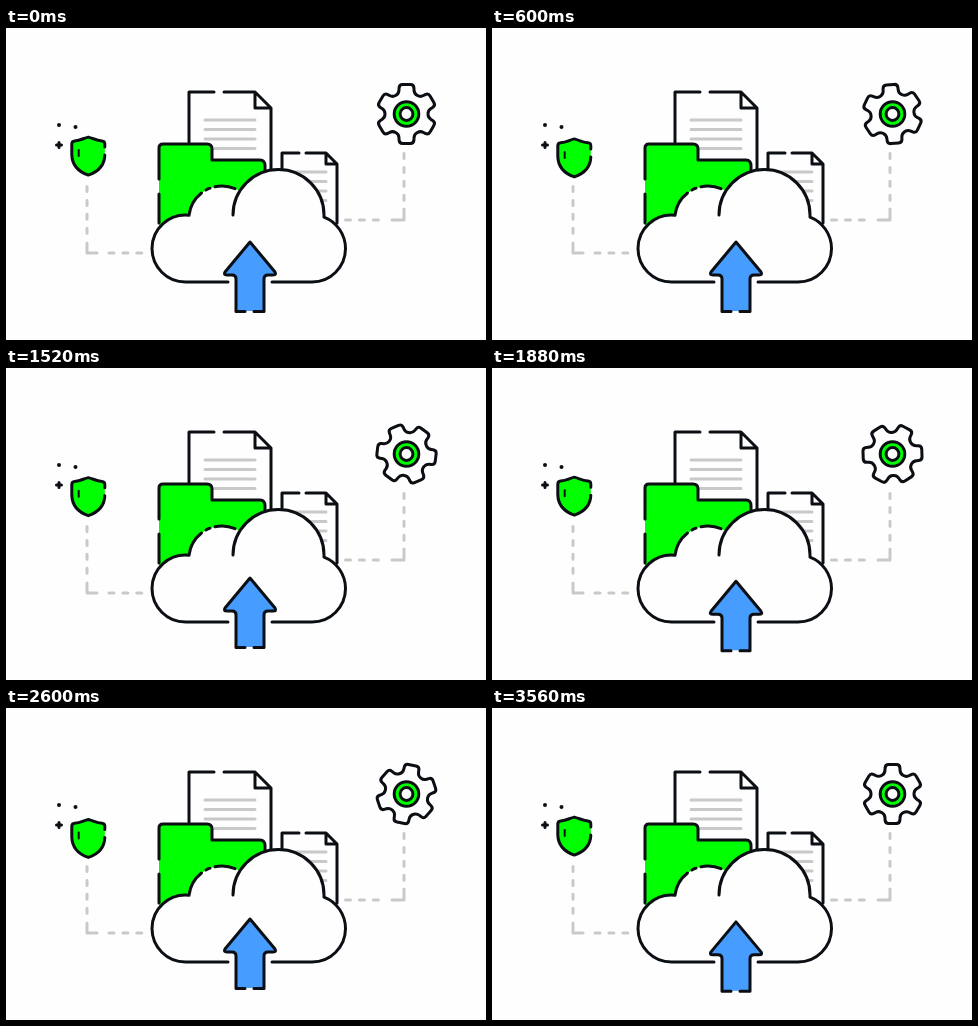
An HTML page that plays this animation: 480x312 px, repeating every 3.6 s.

```html
<!DOCTYPE html>
<html lang="en">
<head>
<meta charset="utf-8">
<title>Cloud upload</title>
<style>
  html, body { margin: 0; width: 100%; height: 100%; overflow: hidden; background: #fefefe; }
  svg { display: block; width: 480px; height: 312px; }
  .ink { fill: none; stroke: #0b0f14; stroke-width: 3; stroke-linecap: round; stroke-linejoin: round; }
  .grey { fill: none; stroke: #c9c9c9; stroke-width: 3; stroke-linecap: round; stroke-linejoin: round; }
  .dash { stroke-dasharray: 5 8.9; }
  .white { fill: #fefefe; }
  .green { fill: #00ff00; }
  .blue { fill: #469cff; }
</style>
</head>
<body>
<svg viewBox="0 0 480 312" xmlns="http://www.w3.org/2000/svg">
  <!-- connectors -->
  <path class="grey" d="M81 215V225H91M398 181V192H386"/>
  <path class="grey dash" d="M81 158.500V208M103 225H136M398 125.500V174M339.500 192H376"/>

  <!-- large page -->
  <path class="white" d="M183 64H249L265 80V150H183Z"/>
  <path class="grey" d="M199 92H249M199 101.500H249M199 111H249M199 120.500H249"/>
  <path class="ink" d="M183 114V64H208M218 64H249L265 80V142M249 64V80H265"/>

  <!-- small page -->
  <path class="white" d="M276 125H320L331 136V200H276Z"/>
  <path class="grey" d="M287 144H320M287 153.500H320M287 163H320M287 172.500H320"/>
  <path class="ink" d="M276 140V125H293M300 125H320L331 136V195M320 125V136H331"/>

  <!-- folder -->
  <path class="green" d="M153 200V120Q153 116 157 116H201Q206 116 206 121V132H254Q259 132 259 138V200Z"/>
  <path class="ink" d="M153 195V166M153 151V120Q153 116 157 116H201Q206 116 206 121V132H254Q259 132 259 138V143"/>

  <!-- cloud -->
  <path class="white" d="M179.500 254A33.500 33.500 0 0 1 146 220.500A33.500 33.500 0 0 1 183 187.200A33.500 33.500 0 0 1 234 163.200A45.500 45.500 0 0 1 318 187V189.200A33.500 33.500 0 0 1 339.500 220.500A33.500 33.500 0 0 1 306 254Z"/>
  <path class="ink" d="M222 254H179.500A33.500 33.500 0 0 1 146 220.500A33.500 33.500 0 0 1 183 187.200A33.500 33.500 0 0 1 195.500 165M200 162A33.500 33.500 0 0 1 204 160.200M209 158.700A33.500 33.500 0 0 1 229 160.600M227 187A45.500 45.500 0 0 1 318 187V189.200A33.500 33.500 0 0 1 339.500 220.500A33.500 33.500 0 0 1 306 254H266"/>

  <!-- arrow -->
  <g id="arrow">
    <path class="blue" d="M244 214L269 244Q271 247 267 247H262Q258 247 258 251V283H230V251Q230 247 226 247H221Q217 247 219 244Z"/>
    <path class="ink" d="M239 283.500H230V251Q230 247 226 247H221Q217 247 219 244L244 214L269 244Q271 247 267 247H262Q258 247 258 251V283.500H248"/>
  </g>

  <!-- sparkles -->
  <g fill="#0b0f14">
    <circle cx="53" cy="97" r="2"/>
    <circle cx="69.500" cy="99" r="2"/>
  </g>
  <path class="ink" d="M50.500 117H55.500M53 114.500V119.500"/>

  <!-- shield -->
  <g id="shield">
    <path class="green" d="M82.300 108.500C87 109.500 90 112 96 112.300Q98.800 112.500 98.800 115.500V126C98.500 137 91 143.500 82.300 146.500C73.600 143.500 66.100 137 65.800 126V115.500Q65.800 112.500 68.600 112.300C74.600 112 77.600 109.500 82.300 108.500Z"/>
    <path class="ink" d="M98.800 118.500V115.500Q98.800 112.500 96 112.300C90 112 87 109.500 82.300 108.500C77.600 109.500 74.600 112 68.600 112.300Q65.800 112.500 65.800 115.500V126C66.100 137 73.600 143.500 82.300 146.500C91 143.500 98.500 137 98.800 126.500"/>
    <path class="ink" style="stroke-width:2" d="M72.700 121.500V127.500"/>
  </g>

  <!-- gear -->
  <g transform="translate(400.500 86)">
    <path id="gear" class="ink" style="fill:#fefefe"/>
    <circle class="ink" r="12.300" style="fill:#00ff00"/>
    <circle class="ink" r="6.400" style="fill:#fefefe"/>
  </g>
</svg>
<script>
  const LOOP = 3600, TEETH = 6;
  const el = id => document.getElementById(id);
  const arrow = el('arrow'), shield = el('shield'), gear = el('gear');

  // closed polygon with softened corners
  function rounded(pts, r) {
    const toward = (a, b) => {
      const dx = b[0] - a[0], dy = b[1] - a[1];
      const k = Math.min(r / Math.hypot(dx, dy), 0.45);
      return [a[0] + dx * k, a[1] + dy * k];
    };
    const n = pts.length;
    return pts.map((p, i) => {
      const from = toward(p, pts[(i + n - 1) % n]);
      const to = toward(p, pts[(i + 1) % n]);
      return (i ? 'L' : 'M') + from + 'Q' + p + ' ' + to;
    }).join('') + 'Z';
  }

  function gearPath() {
    const corners = [[-20.5, 21.8], [-14, 30.3], [14, 30.3], [20.5, 21.8]];
    const pts = [];
    for (let i = 0; i < TEETH; i++) {
      for (const [deg, r] of corners) {
        const a = (deg + i * 360 / TEETH) * Math.PI / 180;
        pts.push([r * Math.sin(a), -r * Math.cos(a)]);
      }
    }
    return rounded(pts, 3.5);
  }

  // 0 at the start of each period, 1 halfway
  const swing = (t, period) => (1 - Math.cos(2 * Math.PI * t / period)) / 2;
  const ease = u => u * u * (3 - 2 * u);

  function draw(t) {
    // one tooth step per loop, counter-clockwise
    gear.setAttribute('transform', `rotate(${-360 / TEETH * ease(t / LOOP)})`);
    arrow.setAttribute('transform', `translate(0 ${-4 * swing(t, 600)})`);
    shield.setAttribute('transform', `translate(0 ${0.6 + 2.4 * swing(t, 1800)})`);
  }

  gear.setAttribute('d', gearPath());
  const start = performance.now();
  function tick() {
    draw((performance.now() - start) % LOOP);
    requestAnimationFrame(tick);
  }
  draw(0);
  requestAnimationFrame(tick);
</script>
</body>
</html>
```
